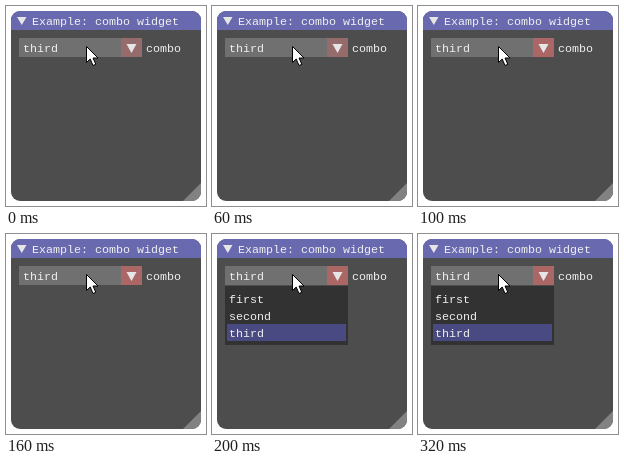
These frames come from a looping animation (200x200 px, 400 ms). An HTML page:

```html
<!DOCTYPE html>
<html>
<head>
<meta charset="utf-8">
<style>
  html, body { margin: 0; width: 100%; height: 100%; overflow: hidden; background: #fff; }
  svg { display: block; }
  text { font: 11.667px "Liberation Mono", "DejaVu Sans Mono", monospace; fill: #f0f0f0; white-space: pre; }
  .mark { fill: #e6e6e6; }
</style>
</head>
<body>
<svg width="200" height="200" viewBox="0 0 200 200">
  <!-- window -->
  <rect x="5" y="5" width="190" height="190" rx="9" fill="#4d4d4d"/>
  <path d="M5 24V14a9 9 0 0 1 9-9H186a9 9 0 0 1 9 9V24z" fill="#6969af"/>
  <path d="M195 177V186a9 9 0 0 1-9 9H177z" fill="#828282"/>
  <path class="mark" d="M11 11H20.5L15.75 19z"/>
  <text x="26" y="19">Example: combo widget</text>

  <!-- combo -->
  <rect x="13" y="32" width="102" height="19" fill="#707070"/>
  <rect id="button" x="115" y="32" width="21" height="19"/>
  <path class="mark" d="M120.5 38H130.5L125.5 47z"/>
  <text x="17" y="46">third</text>
  <text x="140" y="46">combo</text>

  <!-- list -->
  <g id="list">
    <rect x="13" y="52" width="123" height="59" fill="#323232"/>
    <rect x="15" y="90" width="119" height="17" fill="#4a4a83"/>
    <text x="17" y="69">first</text>
    <text x="17" y="86">second</text>
    <text x="17" y="103">third</text>
  </g>

  <!-- pointer -->
  <path d="M80.5 40.5V56.5L84.2 53L87 59.5L89.8 58.3L87 52H92z" fill="#fff" stroke="#000"/>
</svg>
<script>
  const button = document.getElementById('button');
  const list = document.getElementById('list');

  function draw(now) {
    const t = now % 400;
    button.setAttribute('fill', t < 100 ? '#956b6b' : '#ab6666');
    list.setAttribute('visibility', t < 200 ? 'hidden' : 'visible');
    requestAnimationFrame(draw);
  }
  draw(0);
</script>
</body>
</html>
```
